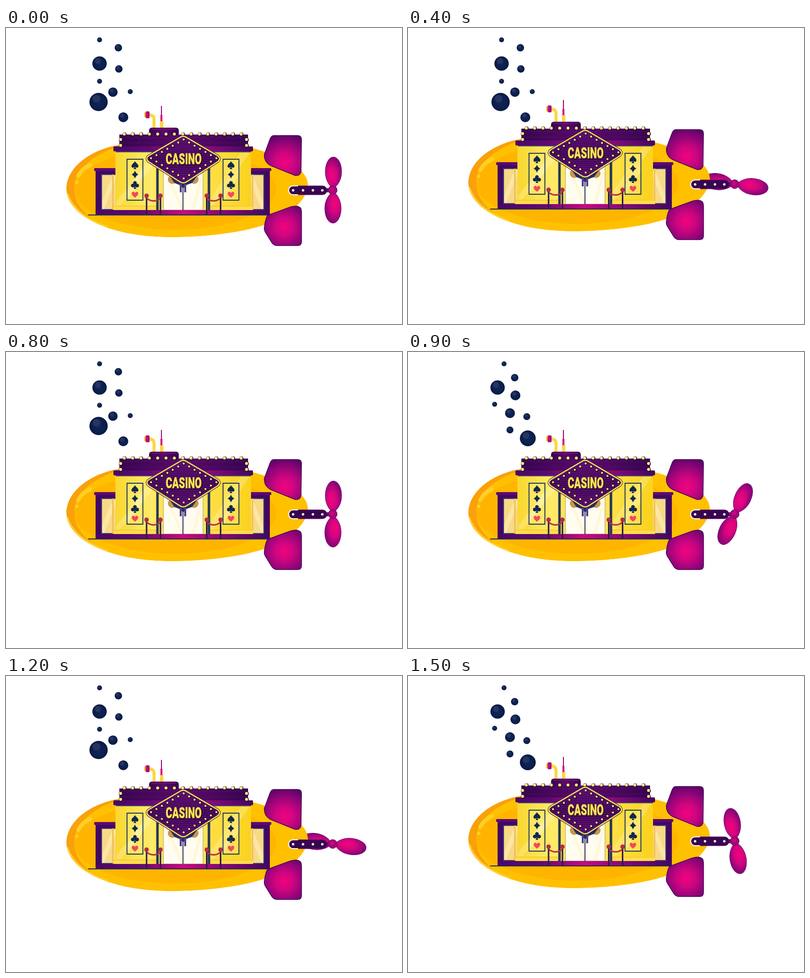
Animation of 800 by 600 pixels, one loop 1.6 s. Source, as an HTML page:

```html
<!DOCTYPE html>
<html lang="en">
<head>
<meta charset="utf-8">
<title>Submarine</title>
<style>
  html, body { margin: 0; width: 100%; height: 100%; overflow: hidden; background: #fff; }
  svg { display: block; width: 800px; height: 600px; }
  text { font: 900 32px Roboto, "Open Sans", sans-serif; text-anchor: middle; }
</style>
</head>
<body>
<svg viewBox="0 0 800 600">
  <defs>
    <radialGradient id="finTop" gradientUnits="userSpaceOnUse" cx="563" cy="272" r="62">
      <stop offset="0" stop-color="#f2037d"/><stop offset=".3" stop-color="#cf0580"/>
      <stop offset=".65" stop-color="#900478"/><stop offset="1" stop-color="#4d0561"/>
    </radialGradient>
    <radialGradient id="finLow" href="#finTop" gradientUnits="userSpaceOnUse" cx="562" cy="404" r="60"/>
    <radialGradient id="blade" cx=".4" cy=".62" r=".6">
      <stop offset="0" stop-color="#f5037c"/><stop offset=".5" stop-color="#d10580"/><stop offset="1" stop-color="#850575"/>
    </radialGradient>
    <linearGradient id="band">
      <stop offset="0" stop-color="#4a0668"/><stop offset=".25" stop-color="#5f0a70"/>
      <stop offset=".5" stop-color="#c60a83"/><stop offset=".75" stop-color="#7a0a76"/><stop offset="1" stop-color="#430660"/>
    </linearGradient>
    <linearGradient id="roof">
      <stop offset="0" stop-color="#35054f"/><stop offset=".5" stop-color="#5c0a6b"/><stop offset="1" stop-color="#35054f"/>
    </linearGradient>
    <linearGradient id="wall">
      <stop offset="0" stop-color="#f9d72f"/><stop offset=".25" stop-color="#ffea68"/>
      <stop offset=".7" stop-color="#ffdf45"/><stop offset="1" stop-color="#fad21d"/>
    </linearGradient>
    <linearGradient id="sign" x2="0" y2="1">
      <stop offset="0" stop-color="#5b0c70"/><stop offset=".5" stop-color="#3b0753"/><stop offset="1" stop-color="#500a69"/>
    </linearGradient>
    <radialGradient id="bubble">
      <stop offset="0" stop-color="#102657"/><stop offset=".75" stop-color="#0a1f4e"/><stop offset="1" stop-color="#06163d"/>
    </radialGradient>
    <pattern id="lines" width="8" height="4" patternUnits="userSpaceOnUse">
      <path d="M0 1H8" stroke="#85208d" stroke-width="1" opacity=".55"/>
    </pattern>
    <path id="hullShape" d="M122 326C122 285 165 250 222 238C300 222 430 222 500 244C560 260 610 285 610 318C610 350 565 386 520 400C470 416 400 424 333 424C205 424 122 378 122 326Z"/>
    <clipPath id="hullClip"><use href="#hullShape"/></clipPath>
    <path id="spade" d="M0-8C2-4 7-2 7 2C7 6 2 6 1 3Q1 6 3 8H-3Q-1 6-1 3C-2 6-7 6-7 2C-7-2-2-4 0-8Z"/>
    <path id="diamond" d="M0-8Q2-2 7 0Q2 2 0 8Q-2 2-7 0Q-2-2 0-8Z"/>
    <path id="club" d="M-3 8Q-1 6-1 3A3.7 3.7 0 1 1-3-2A3.6 3.6 0 1 1 3-2A3.7 3.7 0 1 1 1 3Q1 6 3 8Z"/>
    <path id="heart" d="M0 6C-3 3-6.500 1-6.500-2.500C-6.500-7-1.500-7 0-3.500C1.500-7 6.500-7 6.500-2.500C6.500 1 3 3 0 6Z"/>
    <g id="panel" fill="#122849">
      <rect x="-16" y="266" width="32" height="83" fill="#ffed87" fill-opacity=".4" stroke="#25395a" stroke-width="2"/>
      <path d="M-15 330L15 284V304L-15 348Z" fill="#fff" opacity=".25"/>
      <use href="#spade" y="278"/><use href="#diamond" y="297"/><use href="#club" y="318"/>
      <use href="#heart" y="338" fill="#f4485c"/>
    </g>
    <g id="wing">
      <path d="M181 288H222V377H181Z" fill="#420761"/>
      <rect x="178" y="284" width="46" height="6" rx="2" fill="#5a0a72"/>
      <path d="M193 297H222V368H193Z" fill="#f8d985" stroke="#3c3b79" stroke-width="2"/>
      <path d="M194 352L216 298H221V310L198 367H194Z" fill="#fff1bd" opacity=".6"/>
      <path d="M216 297V368" stroke="#f0bd55" stroke-width="3"/>
    </g>
    <g id="barrier">
      <path d="M284 340V378M312 340V378" stroke="#2b184b" stroke-width="3"/>
      <path d="M285 346Q298 355 311 346" fill="none" stroke="#b92e48" stroke-width="3"/>
      <g fill="#b32d47"><circle cx="284" cy="340" r="4.500"/><circle cx="312" cy="340" r="4.500"/></g>
    </g>
    <path id="vane" d="M-4-6C-11-13-16-24-16-37C-16-53-9-67 0-67C10-67 17-54 17-37C17-23 11-12 4-6Z" fill="url(#blade)" stroke="#780873"/>
  </defs>

  <g id="bubbles"></g>

  <g id="sub">
    <g id="propeller"><use href="#vane"/><use href="#vane" transform="rotate(180)"/></g>

    <g clip-path="url(#hullClip)">
      <use href="#hullShape" fill="#ffc000"/>
      <path d="M122 326C122 285 165 250 222 238L240 236C170 256 138 290 138 325C138 350 150 368 172 386L160 384Q122 355 122 326Z" fill="#f9a00b"/>
      <ellipse cx="342" cy="327" rx="204" ry="82" fill="#ffb500"/>
      <path d="M146 300Q154 284 170 278" fill="none" stroke="#ffcf25" stroke-width="8" stroke-linecap="round"/>
      <circle cx="143" cy="313" r="3.500" fill="#ffcf25"/>
      <path d="M124 335Q138 380 205 403" fill="none" stroke="#ffd02b" stroke-width="3"/>
    </g>

    <path d="M299 203V185Q299 176 288 176" fill="none" stroke="#fbd743" stroke-width="6"/>
    <rect x="279" y="171" width="5" height="10" rx="2" fill="#f5c32d"/>
    <rect x="282" y="169" width="8" height="14" rx="2" fill="#a70b7b"/>
    <path d="M284 170V182" stroke="#df087e" stroke-width="2"/>
    <path d="M314 158V180" stroke="#9b0b74" stroke-width="2"/>
    <path d="M314 176V190" stroke="#db087e" stroke-width="4"/>
    <rect x="311" y="189" width="7" height="15" fill="#fbd743"/>
    <path d="M289 217V208Q289 202 295 202H343Q349 202 349 208V217Z" fill="url(#roof)"/>
    <path d="M294 205H344" stroke="#720c76" stroke-width="2"/>

    <use href="#wing"/>
    <use href="#wing" transform="matrix(-1 0 0 1 714 0)"/>
    <path d="M221 249H495V369H221Z" fill="url(#wall)"/>
    <path d="M223 352L300 253H318L231 360H223ZM410 350L474 253H492L418 361H410Z" fill="#fff" opacity=".22"/>
    <path d="M217 360H306V369H217ZM411 360H499V369H411Z" fill="#ffdc4b"/>
    <path d="M217 361H306M411 361H499" stroke="#eebc20"/>
    <path d="M229 216H489V241H229Z" fill="url(#roof)"/>
    <path d="M229 222H489M229 233H489" stroke="#68106e" opacity=".5"/>
    <rect x="217" y="240" width="282" height="10" rx="2" fill="url(#band)"/>
    <path d="M222 251H495" stroke="#46446f" stroke-width="2"/>
    <use href="#panel" x="260.500"/><use href="#panel" x="454.500"/>

    <path d="M306 270V369M410 270V369" stroke="#233657" stroke-width="5"/>
    <path d="M311 270H405V369H311Z" fill="#ffe35a"/>
    <path d="M318 290H398V369H318Z" fill="#fffdf0" stroke="#a49d65"/>
    <path d="M323 290L356 368M396 300L378 368" stroke="#fff2be" stroke-width="5" opacity=".5"/>
    <circle cx="336" cy="307" r="9" fill="#c89552"/><circle cx="380" cy="307" r="9" fill="#c89552"/>
    <path d="M331 300H386L376 314L365 318L358 325L350 318L340 314Z" fill="#252d5c"/>
    <path d="M357.500 318V369" stroke="#31305d" stroke-width="2"/>
    <path d="M353 316V333M362 316V333" stroke="#514087" stroke-width="4"/>

    <path d="M181 369H533V378H181Z" fill="url(#band)"/>
    <path d="M166 379H536" stroke="#292b52" stroke-width="2"/>
    <use href="#barrier"/><use href="#barrier" x="121.500"/>

    <g id="roofBulbs"></g>
    <g stroke-linejoin="round">
      <path id="signShape" d="M351 222Q358 217 365 222L428 259Q435 265 428 271L366 311Q358 317 350 311L288 271Q281 265 288 259Z" fill="url(#sign)" stroke="#2d184b" stroke-width="4"/>
      <use href="#signShape" fill="none"/>
      <path d="M351 222Q358 217 365 222L428 259Q435 265 428 271L366 311Q358 317 350 311L288 271Q281 265 288 259Z" fill="url(#lines)" stroke="#ffe15a" stroke-width="2.500"/>
    </g>
    <g id="signBulbs"></g>
    <g transform="translate(359 276) scale(.62 1)">
      <text x="2" y="1" fill="#23032f" stroke="#23032f" stroke-width="2">CASINO</text>
      <text fill="#ffe253" stroke="#ffe253" stroke-width=".6">CASINO</text>
    </g>

    <g stroke="#46055d" stroke-width="1.500">
      <path d="M541 218H589Q597 218 597 226L596 291Q594 300 584 299L535 279Q521 272 522 256L533 226Q536 218 541 218Z" fill="url(#finTop)"/>
      <path d="M587 361Q597 362 597 372V433Q597 441 589 441H548Q541 441 537 435L524 414Q521 409 522 404Q523 392 527 382Q529 379 536 377L574 363Q580 361 587 361Z" fill="url(#finLow)"/>
    </g>
    <path d="M646 329H660" stroke="#67086b" stroke-width="8"/>
    <circle cx="660" cy="328.500" r="9" fill="#a20776" stroke="#6c0769"/>
    <circle cx="659" cy="327" r="4" fill="#c7087d"/>
    <rect x="571.500" y="320" width="77" height="18" rx="9" fill="#380650" stroke="#5b0b6b"/>
    <path d="M590 338H580A9 9 0 0 1 580 320H590" fill="none" stroke="#fff" stroke-width="2"/>
    <g fill="#fff"><circle cx="580" cy="329" r="2.500"/><circle cx="600" cy="329" r="2.500"/><circle cx="620" cy="329" r="2.500"/><circle cx="639" cy="329" r="2.500"/></g>
  </g>
</svg>
<script>
const $ = id => document.getElementById(id);
const circle = (x, y, r, fill, more = '') => `<circle cx="${x}" cy="${y}" r="${r}" fill="${fill}" ${more}/>`;
const bulb = (x, y, r) => circle(x + .5, y + .5, r + 1, '#2a0838') + circle(x, y, r, '#ffeb70') + circle(x - .8, y - .8, r / 2.5, '#fff7b5');

// Marquee lights on the roof and around the sign
let lights = '';
for (let i = 0; i < 15; i++) lights += bulb(239 + i * 16.86, 215, 3);
for (const y of [226, 238]) lights += bulb(231.5, y, 3) + bulb(486, y, 3);
$('roofBulbs').innerHTML = lights;

const corners = [[293, 264], [359, 226], [425, 264], [359, 305]];
$('signBulbs').innerHTML = corners.map(([x, y], side) => {
  const [nx, ny] = corners[(side + 1) % 4];
  return [0, 1, 2, 3, 4, 5].map(i => bulb(x + (nx - x) * i / 6, y + (ny - y) * i / 6, 2)).join('');
}).join('');

// Bubble poses: x, y, radius
const wide = [[189,24,5], [227,40,7.5], [189,72,14.5], [228,83,7.5], [189,108,5], [216,130,9.5], [251,129,5], [187,150,18.5], [237,181,10]];
const mid = [[194,24,5], [215.5,52,7.5], [181,72,14.5], [217,88,10], [175,106,5], [206,124,10], [240,131,7], [206,158,7], [242,175,16]];
const tight = [[171,23,5], [209,39,7.5], [171,72,14.5], [202,72,5], [219,99,7.5], [197,118,10], [233,128,5], [197,152,10], [244,169,23]];
const poses = [wide, mid, tight, mid].map(pose => pose.map(([x, y, r]) =>
  circle(x, y, r, 'url(#bubble)') + circle(x - r * .22, y - r * .35, r * .42, '#26345f')).join(''));

const triangle = n => Math.abs((n + 6) % 8 - 4) - 2;
let lastStep = -1;

function draw(now) {
  const step = Math.floor(now / 100) % 16;
  if (step !== lastStep) {
    lastStep = step;
    const bob = 6 * triangle(Math.floor(step / 2));
    $('sub').setAttribute('transform', `translate(0 ${-bob})`);
    $('propeller').setAttribute('transform', `translate(661 328.5) rotate(${step % 8 * 24.3})`);
    $('bubbles').innerHTML = poses[step % 4];
  }
  requestAnimationFrame(draw);
}
draw(performance.now());
</script>
</body>
</html>
```
